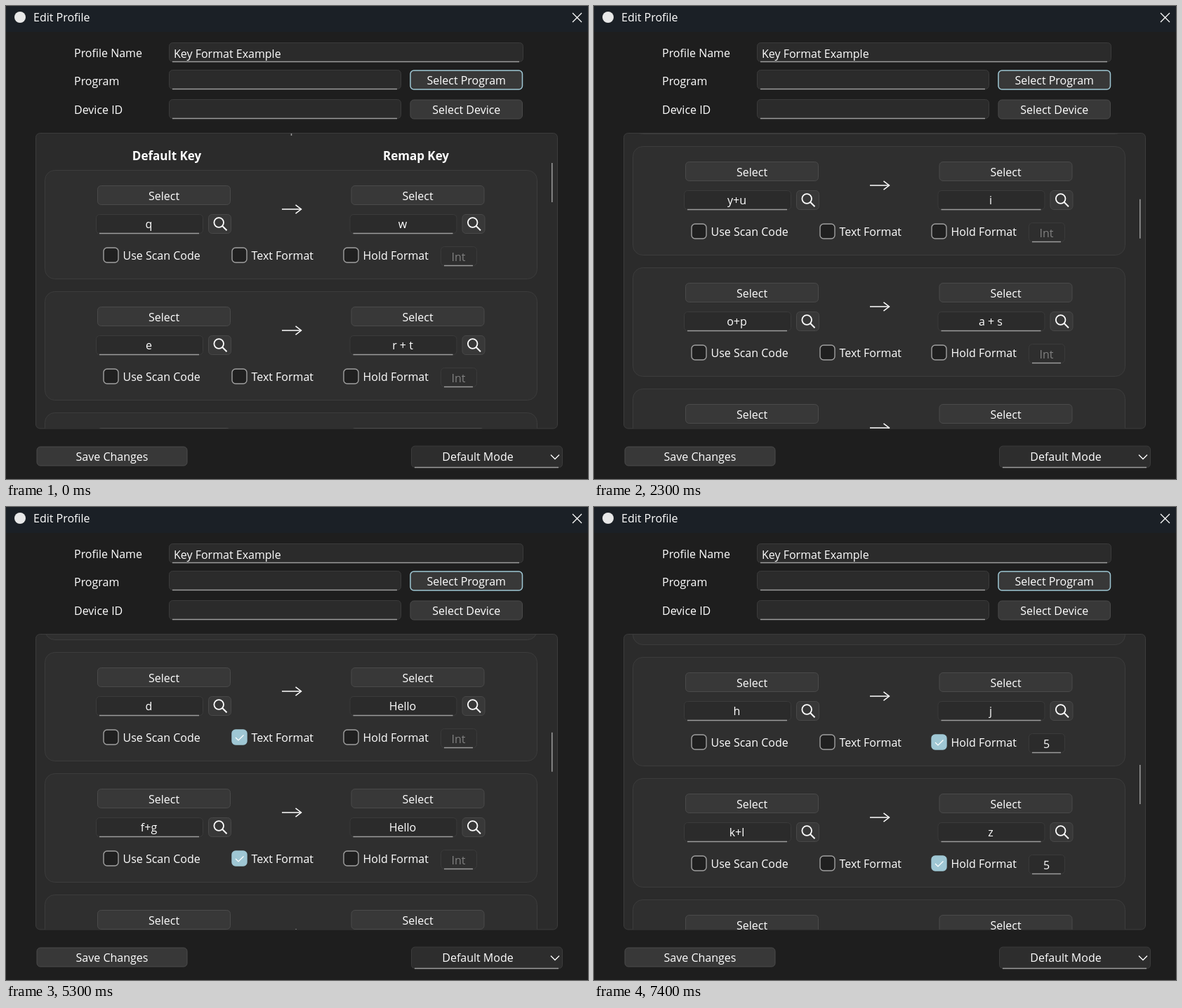
These frames come from a looping animation (829x675 px, 8000 ms). An HTML page with a canvas:

```html
<!DOCTYPE html>
<html lang="en">
<head>
<meta charset="utf-8">
<title>Edit Profile</title>
<style>
  html, body { margin: 0; width: 100%; height: 100%; overflow: hidden; background: #1e1e1e; }
  canvas { display: block; width: 829px; height: 675px; }
</style>
</head>
<body>
<canvas id="stage" width="829" height="675"></canvas>
<script>
const ctx = document.getElementById('stage').getContext('2d');
const LOOP = 8000;
const WHITE = '#ffffff', LINE = '#9c9c9c', ACCENT = '#9fc7d4';
const FONT = '"Open Sans", "Noto Sans", sans-serif';

const scrollSteps = [[6500, 1058], [3500, 719], [500, 380], [0, 0]];

const CARD_TOP = 235, CARD_PITCH = 173;
const rows = [
  { from: 'q', to: 'w' },
  { from: 'e', to: 'r + t' },
  { from: 'y+u', to: 'i' },
  { from: 'o+p', to: 'a + s' },
  { from: 'd', to: 'Hello', text: true },
  { from: 'f+g', to: 'Hello', text: true },
  { from: 'h', to: 'j', hold: '5' },
  { from: 'k+l', to: 'z', hold: '5' },
  { from: '', to: '' }
];

function box(x, y, w, h, r, fill, stroke, lineWidth = 1) {
  ctx.beginPath();
  ctx.roundRect(x + 0.5, y + 0.5, w - 1, h - 1, r);
  ctx.fillStyle = fill;
  ctx.fill();
  ctx.strokeStyle = stroke;
  ctx.lineWidth = lineWidth;
  ctx.stroke();
}

function path(points, color = WHITE, width = 1.5) {
  ctx.beginPath();
  points.forEach(([x, y]) => ctx.lineTo(x, y));
  ctx.strokeStyle = color;
  ctx.lineWidth = width;
  ctx.stroke();
}

function label(text, x, baseline, align = 'left', color = WHITE, style = '16px') {
  ctx.font = `${style} ${FONT}`;
  ctx.textAlign = align;
  ctx.fillStyle = color;
  ctx.fillText(text, x, baseline);
}

function button(text, x, y, w, border = '#4a4a4a', lineWidth = 1) {
  box(x, y, w, 28, 5, '#383838', border, lineWidth);
  label(text, x + w / 2, y + 20.5, 'center');
}

function field(x, y, w, h = 28, fill = '#2b2b2b') {
  box(x, y, w, h, 5, fill, '#3b3b3b');
  path([[x + 5, y + h - 0.5], [x + w - 6, y + h - 0.5]], LINE, 1.5);
}

function checkbox(text, x, y, checked) {
  box(x, y, 22, 22, 5, checked ? ACCENT : '#202020', checked ? ACCENT : '#a0a0a0', 1.4);
  if (checked) path([[x + 5.5, y + 11.5], [x + 9.5, y + 15.5], [x + 17, y + 8]], WHITE, 1.2);
  label(text, x + 28, y + 17);
}

function searchButton(x, y) {
  box(x, y, 33, 28, 5, '#383838', '#484848');
  ctx.beginPath();
  ctx.arc(x + 15.2, y + 12, 6.8, 0, Math.PI * 2);
  ctx.strokeStyle = WHITE;
  ctx.lineWidth = 1.8;
  ctx.stroke();
  path([[x + 20, y + 16.8], [x + 26.5, y + 23.3]], WHITE, 2);
}

function keyColumn(key, x, y) {
  button('Select', x + 2, y + 21, 190);
  field(x, y + 62, 153);
  label(key, x + 75.5, y + 82, 'center');
  searchButton(x + 160, y + 62);
}

function card(row, y) {
  box(55, y - 1, 702, 156, 14, '#2f2f2f', '#3c3c3c');
  keyColumn(row.from, 128, y);
  keyColumn(row.to, 489.5, y);
  path([[393, y + 55], [420.5, y + 55]]);
  path([[412.5, y + 48.8], [420.5, y + 55], [412.5, y + 61.2]]);
  checkbox('Use Scan Code', 138.5, y + 109.5, false);
  checkbox('Text Format', 321.5, y + 109.5, row.text);
  checkbox('Hold Format', 480.5, y + 109.5, row.hold);
  field(619, y + 108, 52, 28, row.hold ? '#2b2b2b' : '#2e2e2e');
  label(row.hold || 'Int', 644.5, y + 128.5, 'center', row.hold ? WHITE : '#808080');
}

function panel(scroll) {
  box(42, 181, 744, 422.5, 6, '#2b2b2b', '#3c3c3c');
  ctx.save();
  ctx.beginPath();
  ctx.roundRect(43, 182, 742, 421, 6);
  ctx.clip();
  if (scroll === 0) path([[406.5, 181], [406.5, 185]], LINE, 1.5);
  label('Default Key', 229, 220 - scroll, 'center', WHITE, 'bold 17px');
  label('Remap Key', 584, 220 - scroll, 'center', WHITE, 'bold 17px');
  rows.forEach((row, i) => {
    const y = CARD_TOP + i * CARD_PITCH - scroll;
    if (y > 20 && y < 604) card(row, y);
  });
  const thumb = 224 + scroll * 0.136;
  path([[777.8, thumb], [777.8, thumb + 56]], LINE, 1.5);
  ctx.restore();
}

function chrome() {
  ctx.fillStyle = '#1e1e1e';
  ctx.fillRect(0, 0, 829, 675);
  ctx.fillStyle = '#1b2026';
  ctx.fillRect(0, 0, 829, 37);
  ctx.beginPath();
  ctx.arc(20, 16, 8, 0, Math.PI * 2);
  ctx.fillStyle = '#e8e8e8';
  ctx.fill();
  label('Edit Profile', 39, 22);
  path([[807, 10], [820, 23]], WHITE, 1.3);
  path([[820, 10], [807, 23]], WHITE, 1.3);

  label('Profile Name', 97, 73);
  label('Program', 97, 113);
  label('Device ID', 97, 154);
  field(232, 52, 505);
  label('Key Format Example', 239, 74);
  field(232, 91, 331);
  field(232, 133, 331);
  button('Select Program', 575.5, 91.5, 160.5, ACCENT, 1.5);
  button('Select Device', 575.5, 133.5, 160.5);

  button('Save Changes', 43.5, 628.5, 215);
  field(577, 627.5, 216, 31.5, '#2d2d2d');
  label('Default Mode', 672, 649, 'center');
  path([[776, 640.5], [782, 646.5], [788, 640.5]], WHITE, 1.3);
}

function render(now) {
  const t = now % LOOP;
  const [, scroll] = scrollSteps.find(([start]) => t >= start);
  chrome();
  panel(scroll);
}

const origin = performance.now();
function tick() {
  render(performance.now() - origin);
  requestAnimationFrame(tick);
}
tick();
</script>
</body>
</html>
```
